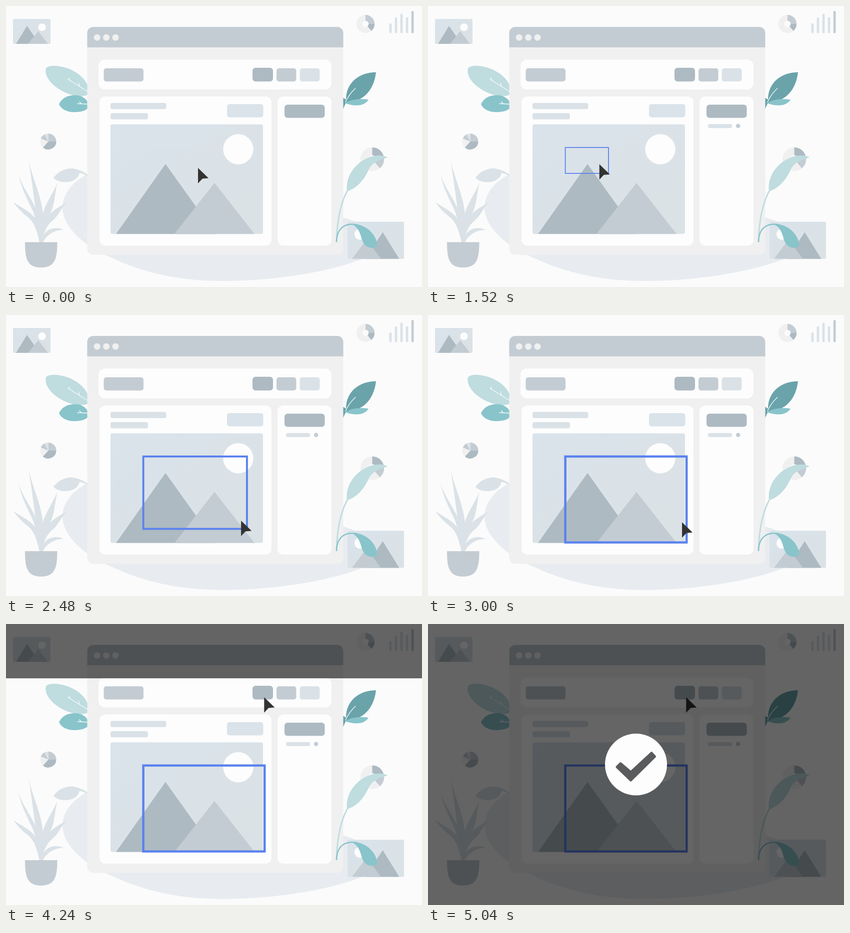
Recreate the animation shown at these times as an HTML page. Size 832 by 564 pixels, loop 5280 ms.

```html
<!DOCTYPE html>
<html lang="en">
<head>
<meta charset="utf-8">
<title>Crop and confirm</title>
<style>
html, body { margin: 0; width: 100%; height: 100%; overflow: hidden; background: #fbfbfb; }
svg { display: block; width: 832px; height: 564px; }
.bg { fill: #fbfbfb; } .panel { fill: #fdfdfd; } .pale { fill: #f0f0f0; }
.dark { fill: #adbac2; } .mid { fill: #c4ccd3; } .light { fill: #dae2e7; }
.mint { fill: #bfdcdf; } .teal { fill: #89c4cb; } .deep { fill: #6aa3aa; }
.vein { fill: none; stroke: #f6fafa; stroke-width: 1.3; stroke-linecap: round; }
</style>
</head>
<body>
<svg viewBox="0 0 832 564">
  <defs>
    <linearGradient id="sky" x1="0" y1="0" x2="1" y2="1">
      <stop offset="0" stop-color="#dae3eb"/>
      <stop offset="1" stop-color="#dbe2e5"/>
    </linearGradient>
  </defs>
  <rect class="bg" width="832" height="564"/>
  <path fill="#e8ecf0" d="M166 336C136 350 113 375 113 405C113 442 155 483 215 507C285 540 360 552 430 552C540 552 650 533 714 507C760 485 735 440 676 425Z"/>

  <!-- top corners -->
  <rect x="14" y="26" width="75" height="50" rx="2" fill="url(#sky)"/>
  <path class="dark" d="M42 40L67 76H20Z"/>
  <path class="mid" d="M64.500 50.500L84 76H44Z"/>
  <circle class="panel" cx="72" cy="42.700" r="7.600"/>
  <g id="charts"></g>

  <!-- left leaves -->
  <path class="mint" d="M80 125C86 118 104 119 123 125C145 133 160 148 164 162V178C154 182 146 181 135 179C105 173 74 146 80 125Z"/>
  <path class="vein" d="M124 147Q144 160 164 172M128 150L126 144M147 161L145 154"/>
  <path class="teal" d="M106 197C112 184 124 179 138 179C150 179 160 185 164 194V205C158 211 148 213 136 213C122 213 110 207 106 197Z"/>
  <path class="vein" d="M143 196L164 197M150 196L147 192"/>

  <!-- pot plant -->
  <g class="light">
    <path d="M45 306C50 341 72 380 74 420C74 440 73 458 72 474H67C64 440 54 370 45 306Z"/>
    <path d="M25 338C34 368 57 392 64 420C68 440 71 455 71 474H67C63 445 60 430 54 412C44 390 32 370 25 338Z"/>
    <path d="M14 393C34 408 55 413 64 437C68 450 71 462 71 474H67C61 448 56 434 44 424C32 415 22 404 14 393Z"/>
    <path d="M103 355C96 380 99 402 84 424C77 438 73 454 72 474H67C67 450 68 436 73 418C79 396 94 376 103 355Z"/>
    <path d="M121 394C109 408 105 421 93 431C81 440 75 456 72 474H67C69 455 72 444 77 433C86 413 104 405 121 394Z"/>
    <path d="M116 450C103 449 92 454 84 461C78 466 76 470 74 474H68C73 462 77 454 86 449C96 444 107 445 116 450Z"/>
    <path d="M95 345C104 331 121 325 133 326C147 328 158 334 165 340V343C158 338 153 336 147 335C145 345 137 351 126 353C113 355 102 352 95 345Z"/>
  </g>
  <path class="mid" d="M38 474H102.500C102.500 505 99 525 70 525C41 525 38 505 38 474Z"/>

  <!-- right leaf pair -->
  <path class="deep" d="M740 133C706 133 680 154 680 188L674 184V207L680 194C708 193 735 176 740 133Z"/>
  <path class="vein" d="M679 193Q686 177 699 165"/>
  <path class="teal" d="M678 195C690 187 708 185 725 188C716 203 694 201 678 195Z"/>

  <!-- browser window -->
  <rect class="pale" x="162.500" y="42" width="512" height="457.500" rx="12"/>
  <path class="mid" d="M162.500 83V54a12 12 0 0 1 12-12H662.500a12 12 0 0 1 12 12V83Z"/>
  <g class="pale">
    <circle cx="182.200" cy="63.200" r="6.500"/>
    <circle cx="200.600" cy="63.200" r="6.500"/>
    <circle cx="219" cy="63.200" r="6.500"/>
  </g>
  <g class="panel">
    <rect x="185" y="107.500" width="466" height="60" rx="13"/>
    <rect x="187" y="181.500" width="344" height="299.500" rx="12"/>
    <rect x="543" y="181.500" width="108" height="299.500" rx="12"/>
  </g>
  <rect class="mid" x="195.500" y="125" width="79.500" height="26.500" rx="5"/>
  <rect id="save" class="dark" x="493" y="124" width="41" height="27.500" rx="6"/>
  <rect class="mid" x="541" y="125" width="39.500" height="26.500" rx="5"/>
  <rect class="light" x="587.500" y="125" width="40" height="26.500" rx="5"/>
  <rect class="light" x="209" y="194.500" width="111.500" height="12.500" rx="4"/>
  <rect class="light" x="209" y="215" width="75" height="12.500" rx="4"/>
  <rect id="crop" x="442" y="197" width="72.500" height="26.500" rx="5" fill="#dae3e9"/>
  <rect x="209" y="237.500" width="305" height="220" rx="4" fill="url(#sky)"/>
  <path class="dark" d="M319 317L419 457.500H220Z"/>
  <path class="mid" d="M417 355L497 457.500H337Z"/>
  <circle class="panel" cx="464.500" cy="287.500" r="30.200"/>
  <rect class="dark" x="557" y="198" width="80.500" height="26.500" rx="6"/>
  <g id="item">
    <rect class="light" x="560" y="237" width="48" height="8" rx="3.500"/>
    <circle class="mid" cx="620.200" cy="240.800" r="4.300"/>
  </g>

  <!-- lower right -->
  <g id="donut"></g>
  <rect x="683" y="433" width="113" height="74.500" rx="2" fill="url(#sky)"/>
  <circle class="panel" cx="708" cy="458" r="11"/>
  <path class="dark" d="M753.500 454L786.500 507.500H718Z"/>
  <path class="mid" d="M721 469L750 507.500H692Z"/>
  <path class="mint" d="M763 304C756 299 743 299 731 302C702 311 678 339 682 372C704 365 718 346 726 327C733 314 746 309 763 304Z"/>
  <path d="M686 365C669 393 662 430 661 473" fill="none" stroke="#bfdcdf" stroke-width="2.800"/>
  <path d="M661 474C661 448 676 434 702 439" fill="none" stroke="#89c4cb" stroke-width="2.400"/>
  <path class="teal" d="M692 438C716 435 743 458 742 481C737 488 722 487 715 476C708 464 711 449 692 438Z"/>

  <rect id="frame" fill="none" stroke="#5b82ee"/>
  <path id="cursor" d="M0 0L21 20.500L9 21.500L0 31Z" fill="#333"/>
  <rect id="shade" width="832" fill="#000" opacity=".6"/>
  <g id="done">
    <circle class="panel" r="62"/>
    <path d="M-38 5L-31 -2L-10.500 15.500L31 -23L37.500 -16L-10.500 31.500Z" fill="#595b5d" stroke="#595b5d" stroke-width="5" stroke-linejoin="round"/>
  </g>
</svg>
<script>
const LOOP = 5280, STEP = 40;
const el = id => document.getElementById(id);
const set = (id, attrs) => { for (const k in attrs) el(id).setAttribute(k, attrs[k]); };
const mix = (a, b, p) => a + (b - a) * p;
const span = (t, a, b) => Math.min(1, Math.max(0, (t - a) / (b - a)));

function slice(cx, cy, r, from, to, cls) {
  const at = deg => {
    const a = (deg - 90) * Math.PI / 180;
    return `${cx + r * Math.cos(a)} ${cy + r * Math.sin(a)}`;
  };
  const large = to - from > 180 ? 1 : 0;
  return `<path class="${cls}" d="M${cx} ${cy}L${at(from)}A${r} ${r} 0 ${large} 1 ${at(to)}Z"/>`;
}

function ring(cx, cy, r, hole, first, second) {
  return slice(cx, cy, r, 140, 360, 'pale') + slice(cx, cy, r, 0, 90, first) +
    slice(cx, cy, r, 90, 140, second) + `<circle class="bg" cx="${cx}" cy="${cy}" r="${hole}"/>`;
}

const bars = [35, 23, 15.5, 22.5, 10].map((y, i) =>
  `<rect class="${i < 4 ? 'light' : 'mid'}" x="${766.5 + i * 11.05}" y="${y}" width="4.800" height="${54.5 - y}" rx="2"/>`);

el('charts').innerHTML = ring(719, 36, 18.2, 6.3, 'mid', 'dark') + bars.join('') +
  slice(84.5, 272, 16, 0, 90, 'mid') + slice(84.5, 272, 16, 90, 222, 'dark') +
  slice(84.5, 272, 16, 222, 292, 'pale') + slice(84.5, 272, 16, 292, 332, 'mid') +
  slice(84.5, 272, 16, 332, 360, 'light');
el('donut').innerHTML = ring(732.5, 307.5, 23.7, 8, 'dark', 'mid');

function cursorAt(t) {
  if (t < 1160) {
    const p = span(t, 0, 560);
    return [mix(384, 478, p), mix(325, 211.5, p)];
  }
  if (t < 2960) {
    const p = span(t, 1120, 2760);
    return [mix(289.6, 507.3, p), mix(277.7, 440.5, p)];
  }
  const p = span(t, 2960, 3440);
  return [mix(507.3, 516.3, p), mix(440.5, 147, p)];
}

function press(id, cx, cy, t, start) {
  const s = 1 - 0.315 * (1 - Math.abs(2 * span(t, start, start + 560) - 1));
  set(id, { transform: `translate(${cx} ${cy}) scale(${s}) translate(${-cx} ${-cy})` });
}

function draw(t) {
  const show = (id, on) => set(id, { visibility: on ? 'visible' : 'hidden' });

  set('cursor', { transform: `translate(${cursorAt(t)})` });
  press('crop', 478.25, 210.25, t, 560);
  press('save', 513.5, 137.75, t, 3560);

  const drag = span(t, 1120, 2760);
  show('item', t >= 1160);
  show('frame', t >= 1160);
  set('frame', {
    x: 274.6, y: 284,
    width: mix(36, 242.6, drag), height: mix(13, 172.5, drag),
    'stroke-width': mix(0.9, 4.5, drag)
  });

  const fall = Math.min(564, Math.max(0, 109 + (t - 4240) * 1.1875));
  set('shade', { height: t < 4160 ? 0 : fall });

  const pop = span(t, 4680, 5040);
  show('done', pop > 0);
  set('done', { transform: `translate(416 282) scale(${pop})` });
}

const begin = performance.now();
function tick(now) {
  const t = Math.max(0, now - begin) % LOOP;
  draw(Math.floor(t / STEP) * STEP);
  requestAnimationFrame(tick);
}
draw(0);
requestAnimationFrame(tick);
</script>
</body>
</html>
```
